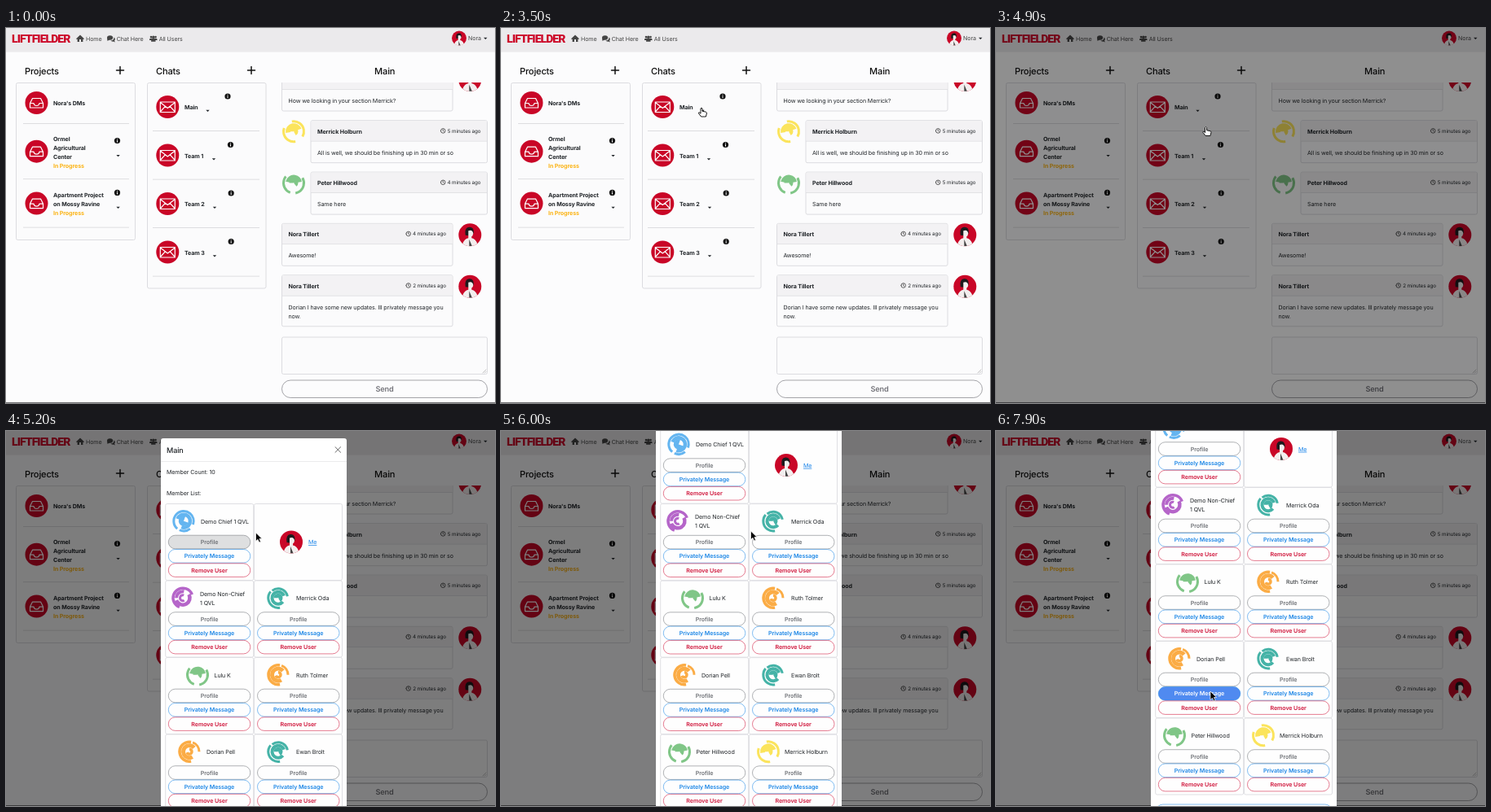
Write an HTML page that moves like this. It is 600 px wide and 461 px high and loops after 8 s.

```html
<!DOCTYPE html>
<html lang="en">
<meta charset="utf-8">
<title>Team chat</title>
<style>
  html, body { margin: 0; height: 100%; overflow: hidden; background: #fcfcfd; }
  svg { display: block; width: 100%; height: 100%; }
  text { font: 7.1px Inter, "Open Sans", sans-serif; letter-spacing: -.015em; text-rendering: geometricPrecision; fill: #212529; }
  .bold { font-weight: 700; }
  .semi { font-weight: 600; }
  .title { font-size: 11.1px; font-weight: 550; fill: #111; }
  .subtitle { font-size: 9.1px; font-weight: 500; }
  .send { font-size: 9.2px; font-weight: 600; fill: #75757b; }
  .nav { fill: #444; }
  .time { font-size: 6.3px; }
  .status { font-weight: 650; fill: #fbb416; }
  .link { fill: #1580e8; text-decoration: underline; }
  .logo { font: 900 14px Roboto, sans-serif; letter-spacing: -.95px; fill: #cc0628; }
  .mid { text-anchor: middle; }
  .end { text-anchor: end; }
  .line { fill: none; stroke-linecap: round; stroke-linejoin: round; }
</style>
<svg id="stage" viewBox="0 0 600 461" preserveAspectRatio="none"></svg>
<script>
const RED = '#c90627', GRAY = '#6f7277', BLUE = '#1b86e6', PRESSED = '#3377ee', EDGE = '#dcdce0';

const text = (x, y, str, cls = '', attrs = '') => `<text x="${x}" y="${y}" class="${cls}" ${attrs}>${str}</text>`;
const rect = (x, y, w, h, fill, stroke = 'none', r = 0, attrs = '') =>
  `<rect x="${x}" y="${y}" width="${w}" height="${h}" rx="${r}" fill="${fill}" stroke="${stroke}" ${attrs}/>`;
const dot = (x, y, r, fill) => `<circle cx="${x}" cy="${y}" r="${r}" fill="${fill}"/>`;
const solid = (d, fill = '#212529') => `<path d="${d}" fill="${fill}"/>`;
const line = (d, stroke, width = 1) => `<path class="line" d="${d}" stroke="${stroke}" stroke-width="${width}"/>`;
const place = (x, y, body) => `<g transform="translate(${x} ${y})">${body}</g>`;
const rule = (x, y, w) => rect(x, y, w, .8, '#d6d6da');

const caret = (x, y) => solid(`M${x - 2.2} ${y - 1}h4.4l-2.2 2.3z`);
const plus = (x, y) => line(`M${x - 4.5} ${y}h9m-4.5-4.5v9`, '#111', 1.5);
const info = (x, y) => place(x, y, dot(0, 0, 3.6, '#111') + line('M0-.2V1.7M0-1.9v.2', '#fff', 1));
const clock = (x, y) => place(x, y, line('M-2.8 0a2.8 2.8 0 1 0 5.6 0a2.8 2.8 0 1 0-5.6 0M0-1.6V0L1 .7', '#222', .7));
const inbox = (x, y) => place(x, y, dot(0, 0, 14, RED) +
  line('M-8 .5L-5-5.5H5L8 .5V6H-8ZM-8 .5H-3.5Q-3 3.5 0 3.5T3.5 .5H8', '#fff', 1.2));
const envelope = (x, y) => place(x, y, dot(0, 0, 14, RED) +
  line('M-9-6H9V6.5H-9ZM-9-5.5L0 1.5 9-5.5M-9 6L-3-.6M9 6L3-.6', '#fff', 1.2));

const person = (x, y, r = 14) => place(x, y, `<g transform="scale(${r / 14})">` + dot(0, 0, 14, RED) +
  solid('M-5.5 .5Q-7-9-1-9.5Q5-10 4.5-2Q2 2-5.5 .5Z', '#1c1a1d') +
  solid('M-2-5Q3-7 4-2Q4 1 2 2V4Q7 5 9 10.7A14 14 0 0 1-9 10.7Q-7 5-2 4Z', '#f3eeee') +
  solid('M-1 5.5L2.5 13.7H-1Z', '#444') + '</g>');

// Each arc: radius, width, start angle, sweep in degrees
const rings = {
  blue: ['#64b5f0', [12.2, 3, 130, 250], [12.2, 3, 50, 65], [8, 4.5, 200, 270], [3.2, 6, 20, 270]],
  purple: ['#b565c9', [12, 3.5, 110, 230], [8.5, 4.5, 330, 190], [8, 4, 180, 100], [3.5, 3, 60, 230]],
  teal: ['#45b3a7', [12.2, 3, 80, 140], [11.5, 3, 230, 120], [7.5, 4, 40, 300], [3, 5, 180, 240]],
  green: ['#80c687', [12.5, 3, 110, 110], [12.5, 3, 330, 110], [7, 6, 190, 160], [3, 5, 180, 230]],
  orange: ['#fbac45', [12, 3.5, 80, 200], [12, 3, 290, 70], [7.5, 5, 60, 260], [3, 3.5, 270, 250]],
  yellow: ['#fbe45c', [12.5, 3, 80, 120], [12.5, 3, 260, 130], [7, 6, 170, 170], [3, 5, 180, 240]],
};
const avatar = (x, y, name) => {
  const [color, ...arcs] = rings[name];
  return place(x, y, arcs.map(([r, w, start, sweep]) =>
    `<circle r="${r}" fill="none" stroke="${color}" stroke-width="${w}" pathLength="360"
      stroke-dasharray="${sweep} 360" transform="rotate(${start})"/>`).join(''));
};

const nav = () => rect(0, 0, 600, 29.5, '#ebeaec') + text(7, 17.7, 'LIFTFIELDER', 'logo') +
  solid('M86 13.2L91 8.6 96 13.2 95 14 94.4 13.6V17H92V14H90V17H87.6V13.6L87 14Z', '#444') + text(98, 15.8, 'Home', 'nav') +
  solid('M124 12a3.6 2.8 0 1 1 3 2.8l-2.6 1zM128.5 15.6q4 0 4-4a2.9 2.6 0 0 1 .5 4l.8 1.8-2.2-.8q-2 .3-3.1-1z', '#444') +
  text(135.7, 15.8, 'Chat Here', 'nav') +
  dot(178, 11, 1.3, '#444') + dot(183.5, 11, 1.3, '#444') + dot(180.8, 11.3, 1.7, '#444') +
  solid('M176 15v-1q0-1.3 1.7-1.3h6q1.8 0 1.8 1.3v1h-2v1.8h-5.4V15Z', '#444') + text(187.7, 15.8, 'All Users', 'nav') +
  person(556, 12.5, 9) + text(567, 15.3, 'Nora', 'nav') + caret(588.3, 12.7);

const project = (y, lines, divider) => {
  const first = y + 3.3 - (lines.length - 1) * 5.5;
  return inbox(37.5, y) +
    lines.map((s, i) => text(58, first + i * 11, s, s === 'In Progress' ? 'status' : 'bold')).join('') +
    (lines.length > 1 ? info(136.5, y - 13.2) + caret(137.6, y + 5.2) : '') + rule(21, divider, 130);
};
const projects = () => text(23, 57, 'Projects', 'title') + plus(140, 52) +
  rect(12.5, 67.5, 146, 193, '#fbfbfc', EDGE, 2) +
  project(92, ['Nora\'s DMs'], 117) +
  project(151.7, ['Ormel', 'Agricultural', 'Center', 'In Progress'], 185.3) +
  project(215.6, ['Apartment Project', 'on Mossy Ravine', 'In Progress'], 244.7);

const chats = () => text(184, 57, 'Chats', 'title') + plus(301, 52) +
  rect(173.5, 67.5, 145.5, 252.5, '#fbfbfc', EDGE, 2) +
  [['Main', 247.5, 272], ['Team 1', 255, 275.5], ['Team 2', 256, 276.2], ['Team 3', 256, 276.2]].map(([name, caretX, infoX], i) => {
    const y = 97 + i * 59.5;
    return envelope(198.3, y) + text(219, y + 3.4, name, 'bold') + caret(caretX, y + 4.7) + info(infoX, y - 13) + rule(180, y + 29.2, 131);
  }).join('');

const message = (y, name, minutes, lines, ring, timeId = '') => {
  const x = ring ? 374 : 338.5, w = ring ? 216.5 : 209.5, end = x + w - 8;
  return rect(x, y, w, 41 + lines.length * 11, '#fbfbfc', EDGE, 2) + rect(x + .5, y + .5, w - 1, 24.5, '#f3f2f4') +
    rect(x, y + 25, w, .8, EDGE) + text(x + 8, y + 15.8, name, 'bold') +
    clock(end - 46.3, y + 12.7) + text(end, y + 15, minutes + ' minutes ago', 'time end', timeId) +
    lines.map((s, i) => text(x + 8, y + 41.9 + i * 11, s)).join('') +
    (ring ? avatar(353, y + 13.5, ring) : person(569.3, y + 14));
};
const messages = () => text(464.7, 57, 'Main', 'title mid') +
  '<clipPath id="feed"><rect x="330" y="67" width="270" height="303"/></clipPath><g clip-path="url(#feed)">' +
  message(50, 'Nora Tillert', 5, ['How we looking in your section Merrick?']) +
  message(113.7, 'Merrick Holburn', 5, ['All is well, we should be finishing up in 30 min or so'], 'yellow') +
  message(177.1, 'Peter Hillwood', 4, ['Same here'], 'green', 'id="age"') +
  message(240.3, 'Nora Tillert', 4, ['Awesome!']) +
  message(303.8, 'Nora Tillert', 2, ['Dorian I have some new updates. Ill privately message you', 'now.']) + '</g>' +
  rect(338.5, 380, 252, 45.5, '#fbfbfc', EDGE, 2) + line('M585 424l4-4m-1.6 4l1.6-1.6', '#999', .6) +
  rect(338.5, 433, 252, 21.5, '#fcfcfd', '#8e8e94', 10.7, 'stroke-width=".8"') + text(464.5, 447, 'Send', 'send mid');

const menu = () => rect(240.5, 116.5, 73, 62.5, '#fff', '#c9c9cd', 2) + rect(240.5, 117, 73, 14.7, '#1a6fe6') +
  ['Members', 'Edit Chat', 'Add User', 'Leave Chat'].map((s, i) =>
    text(248, 127 + i * 14.6, s, '', i ? '' : 'style="fill:#fff"')).join('');

const outline = (x, y, w, color) => rect(x, y, w, 16.6, 'none', color, 8.3, 'stroke-width=".55"');
const button = (x, y, label, color, id, fill = color) => `<g ${id ? `id="${id}"` : ''}>` +
  rect(x, y, 100.5, 16.6, fill, 'none', 8.3, 'fill-opacity="0"') + outline(x, y, 100.5, color) +
  text(x + 50.2, y + 10.8, label, 'semi mid', `style="fill:${color}"`) + '</g>';

const members = [
  [['Demo Chief 1 QVL'], 'blue', 218, 239], null,
  [['Demo Non-Chief', '1 QVL'], 'purple', 217, 238], [['Merrick Oda'], 'teal', 334, 356],
  [['Lulu K'], 'green', 235, 255.5], [['Ruth Tolmer'], 'orange', 334, 356],
  [['Dorian Pell'], 'orange', 225, 246], [['Ewan Brolt'], 'teal', 334, 356],
  [['Peter Hillwood'], 'green', 219, 239.5], [['Merrick Holburn'], 'yellow', 328, 348],
];
const member = (data, i) => {
  const right = i % 2, x = right ? 304.5 : 195.7, y = 89.5 + (i >> 1) * 94.5;
  const box = rect(x, y, 108, 94, '#fefefe', EDGE, 2, 'stroke-width=".9"');
  if (!data) return box + person(350, 136.5) + text(371, 139.2, 'Me', 'link');
  const [lines, ring, ringX, textX] = data, left = right ? 308.5 : 199.3;
  return box + avatar(ringX, y + 21.2, ring) +
    lines.map((s, n) => text(textX, y + 24 + (n - (lines.length - 1) / 2) * 11, s)).join('') +
    button(left, y + 38.7, 'Profile', GRAY, i === 0 && 'profile') +
    button(left, y + 56, 'Privately Message', BLUE, i === 6 && 'private', PRESSED) +
    button(left, y + 73.3, 'Remove User', '#cf1238');
};
const modal = () => rect(190, 9, 228, 600, '#fff', 'none', 3) + text(197, 27, 'Main', 'subtitle') +
  line('M404 19.7l6.6 6.6m0-6.6l-6.6 6.6', '#666', 1) + rect(190, 37, 228, .7, '#e2e2e5') +
  text(197, 53, 'Member Count: 10') + text(197, 79, 'Member List:') + members.map(member).join('') +
  outline(196.5, 573.5, 215.5, BLUE);

const stage = document.getElementById('stage');
stage.innerHTML = rect(0, 0, 600, 461, '#fcfcfd') + nav() + projects() + chats() + messages() +
  rect(0, 460, 600, 1, '#77777a') + `<g id="menu">${menu()}</g>` + rect(0, 0, 600, 461, '#000', 'none', 0, 'id="shade"') +
  `<g id="modal">${modal()}</g><g id="cursor">` +
  '<path id="arrow" d="M0 0V10.5L2.5 8.3 4.2 12 6 11.2 4.4 7.5H7.6Z" fill="#000" stroke="#fff" stroke-width=".7"/>' +
  '<path id="hand" d="M-1 1Q0-.9 1 1V4.2L5.4 5.2Q6.6 5.6 6.4 7L5.4 11H-.4L-3.6 6.8Q-3.6 5.2-2.2 6L-1 7.2Z" fill="#fff" stroke="#000" stroke-width=".9"/></g>';

const find = id => document.getElementById(id);
const [age, menuBox, shade, modalBox, cursor, arrow, hand, profile, privateMsg] =
  ['age', 'menu', 'shade', 'modal', 'cursor', 'arrow', 'hand', 'profile', 'private'].map(find);

const progress = (t, from, to) => Math.min(1, Math.max(0, (t - from) / (to - from)));
const show = (el, on) => el.setAttribute('visibility', on ? 'visible' : 'hidden');
const move = (el, x, y) => el.setAttribute('transform', `translate(${x} ${y})`);

// Cursor stops: time, x, y
const path = [
  [1800, 318, 462], [2200, 312.5, 385], [2600, 285, 290], [3200, 246, 98], [3700, 246, 98], [4200, 257.5, 121.5],
  [4950, 257.5, 121.5], [5200, 306.5, 125], [6000, 306.5, 123], [6500, 306.5, 123], [7250, 303, 255], [7900, 263, 320], [8000, 263, 320],
];
function cursorAt(t) {
  const next = Math.max(1, path.findIndex(stop => stop[0] > t));
  const [t0, x0, y0] = path[next - 1], [t1, x1, y1] = path[next], u = progress(t, t0, t1);
  return [x0 + (x1 - x0) * u, y0 + (y1 - y0) * u];
}

function draw(t) {
  age.textContent = (t < 3300 ? 4 : 5) + ' minutes ago';
  show(menuBox, t >= 3600 && t < 4770);
  shade.setAttribute('opacity', .5 * progress(t, 4770, 4920));

  const drop = -23 * (1 - progress(t, 4920, 5200)) ** 2;
  const scroll = 114.5 * (1 - (1 - progress(t, 5400, 6500)) ** 2.2);
  modalBox.setAttribute('opacity', progress(t, 4920, 5070));
  move(modalBox, 0, drop - scroll);

  const brushed = Math.min(progress(t, 5050, 5120), 1 - progress(t, 5150, 5300));
  profile.firstChild.setAttribute('fill-opacity', brushed / 3);
  const hover = progress(t, 7790, 7920);
  privateMsg.firstChild.setAttribute('fill-opacity', hover);
  privateMsg.lastChild.style.fill = hover > .5 ? '#fff' : BLUE;

  const pointing = t >= 3100 && t < 4970;
  show(cursor, t >= 1800);
  show(arrow, t >= 1800 && !pointing);
  show(hand, pointing);
  move(cursor, ...cursorAt(t));
}

const start = performance.now();
function tick() {
  draw((performance.now() - start) % 8000);
  requestAnimationFrame(tick);
}
tick();
</script>
</html>
```
